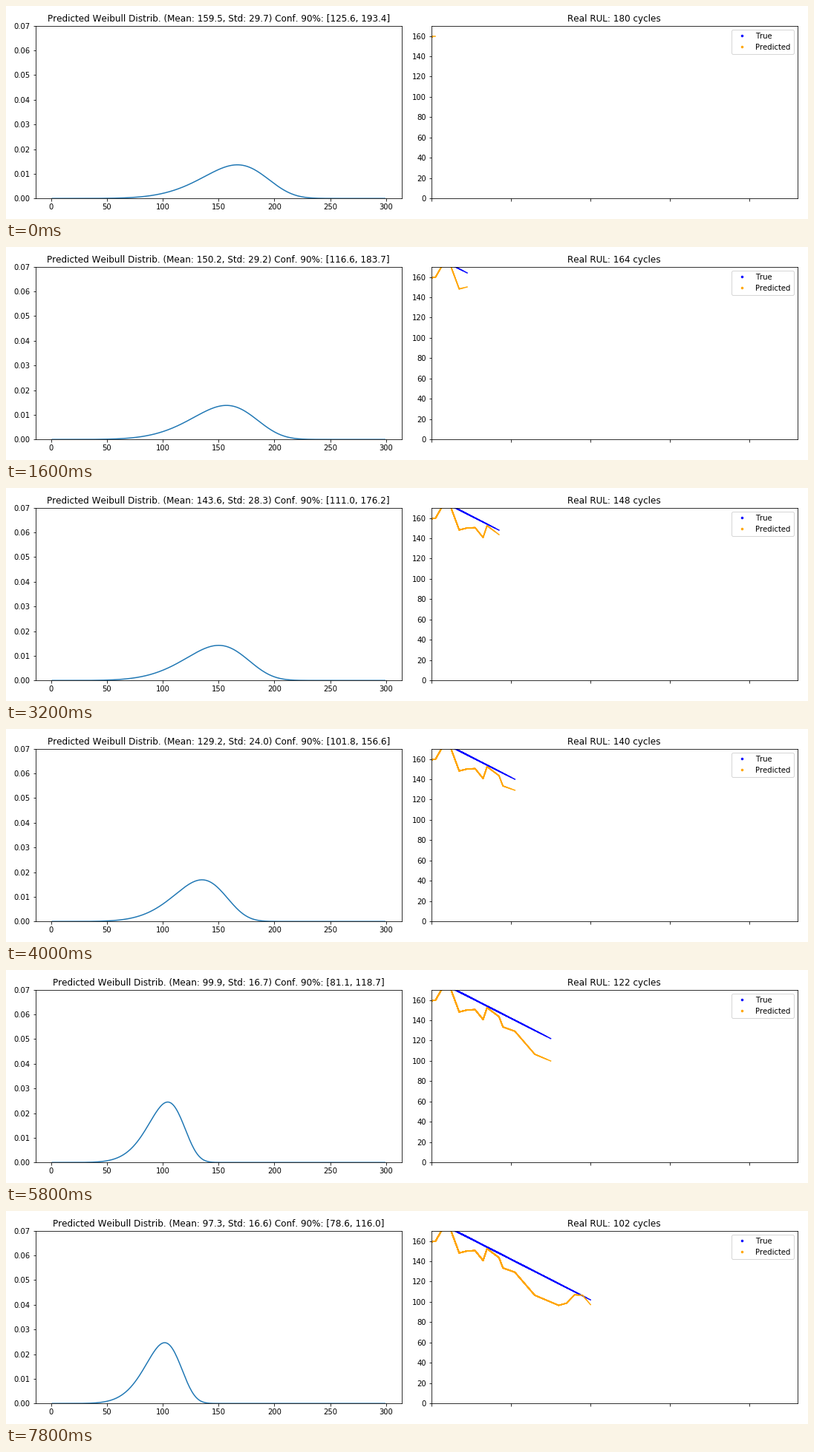
A matplotlib script that plays this animation: 1080x288 px, repeating every 8 s.

```python
import math

import matplotlib.pyplot as plt
import numpy as np
from matplotlib.animation import FuncAnimation

W, H, DPI = 1080, 288, 72
FRAMES, INTERVAL = 40, 200

plt.rcParams["font.family"] = "DejaVu Sans"
plt.rcParams["text.kerning_factor"] = 6

# Turning points (step, value) of the predicted mean
TURNS = [(0, 159.5), (3, 180), (6, 148.2), (8, 150.17), (10, 150.5),
         (12, 140.74), (13, 152.4), (16, 143.6), (17, 133.4), (20, 129.2),
         (25, 106.53), (31, 96.6), (33, 98.76), (35, 107), (37, 106.6),
         (39, 97.3)]


def spread(mu):
    """Standard deviation: a smooth step from short to long predictions."""
    return 16.35 + 13.45 * 0.5 * (1 + math.erf((mu - 126.87) / 13.95 / math.sqrt(2)))


def weibull_shape(cv):
    """Shape parameter with the given coefficient of variation."""
    lo, hi = 1.0, 30.0
    for _ in range(50):
        k = (lo + hi) / 2
        ratio = math.gamma(1 + 2 / k) / math.gamma(1 + 1 / k) ** 2
        if math.sqrt(ratio - 1) > cv:
            lo = k
        else:
            hi = k
    return k


def weibull_pdf(x, mu, sigma):
    k = weibull_shape(sigma / mu)
    scale = mu / math.gamma(1 + 1 / k)
    z = x / scale
    return k / scale * z ** (k - 1) * np.exp(-z ** k)


def add_axes(left, width=492.9, top=26.8, bottom=260.2):
    return fig.add_axes([left / W, 1 - bottom / H, width / W, (bottom - top) / H])


step = np.arange(FRAMES)
real = 180 - 2 * step
mean = np.interp(step, *zip(*TURNS))

fig = plt.figure(figsize=(W / DPI, H / DPI), dpi=DPI, facecolor="white")

ax_pdf = add_axes(39.8)
ax_pdf.set_xlim(-13.9, 313.9)
ax_pdf.set_ylim(0, 0.07)
x = np.arange(1, 300)
curve, = ax_pdf.plot(x, weibull_pdf(x, mean[0], spread(mean[0])), lw=1.5)

ax_rul = add_axes(572.8)
series = [(real, "blue", "True"), (mean, "orange", "Predicted")]
for values, color, label in series:
    ax_rul.plot(0, values[0], ".", ms=5, color=color, label=label)
ax_rul.legend(loc="upper right")
ax_rul.set_xlim(0, 92)
ax_rul.set_ylim(0, 170)
ax_rul.set_xticks(range(0, 92, 20))
ax_rul.set_xticklabels([])

# Each step draws the whole history again, so older parts look heavier
history = []
for n in step:
    history.append([
        ax_rul.plot(range(n + 2), np.r_[values[0], values[:n + 1]],
                    color=color, lw=1.5)[0]
        for values, color, _ in series])


def update(i):
    mu = mean[i]
    sigma = spread(mu)
    half = sigma * (0.97 + 0.93 * sigma / mu)
    curve.set_ydata(weibull_pdf(x, mu, sigma))
    ax_pdf.set_title(f"Predicted Weibull Distrib. (Mean: {mu:.1f}, Std: {sigma:.1f}) "
                     f"Conf. 90%: [{mu - half:.1f}, {mu + half:.1f}]", fontsize=12)
    ax_rul.set_title(f"Real RUL: {real[i]} cycles", fontsize=12)
    for n, pair in enumerate(history):
        for line in pair:
            line.set_visible(n <= i)
    return [curve]


anim = FuncAnimation(fig, update, frames=FRAMES, interval=INTERVAL,
                     repeat=True, repeat_delay=0, blit=False)
plt.show()
```
